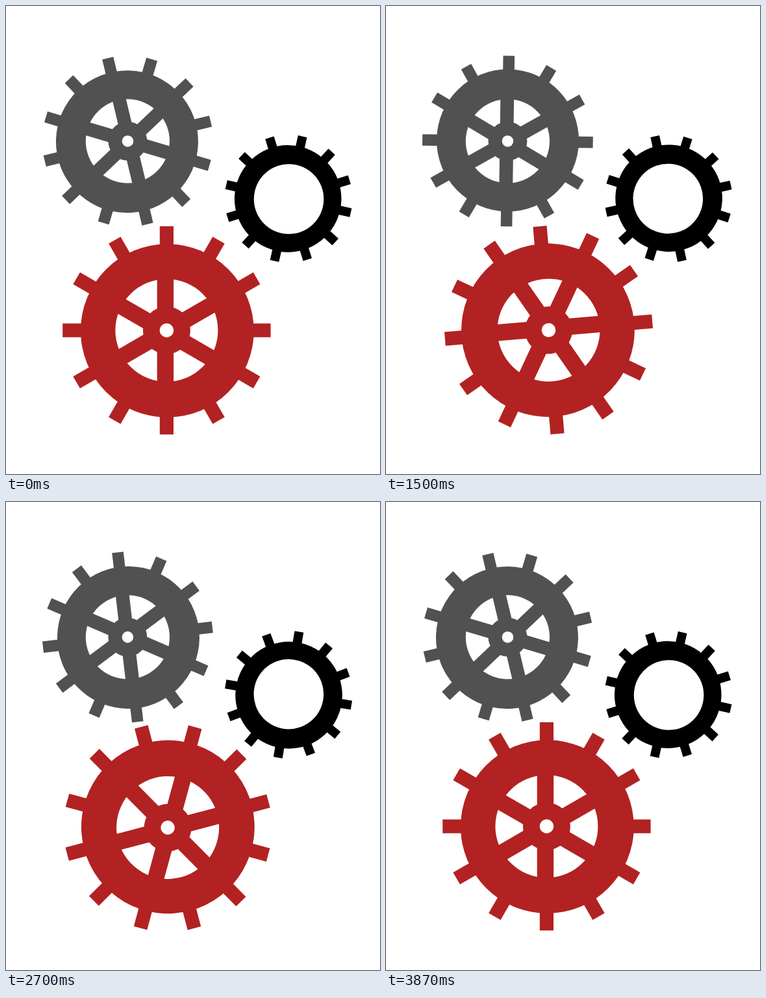
An HTML page that plays this animation: 576x720 px, repeating every 3900 ms.

```html
<!DOCTYPE html>
<html lang="en">
<head>
<meta charset="utf-8">
<title>Turning gears</title>
<style>
  html, body { margin: 0; width: 100%; height: 100%; overflow: hidden; background: #fff; }
  svg { display: block; width: 576px; height: 720px; }
</style>
</head>
<body>
<svg id="stage" viewBox="0 0 576 720" xmlns="http://www.w3.org/2000/svg"></svg>
<script>
const STEP = 30, FRAMES = 130, LAST = FRAMES - 1;

// Offsets are [x, y] from the pivot; each gear runs slightly off centre.
// half: the step at which the first half turn is complete.
const gears = [
  { pivot: [187.4, 207.9], color: '#515151', start: 226.5, half: 67,
    disc: 109.5, discAt: [0.1, -1.2], tooth: [131.3, 17.6], toothAt: [0, 0],
    hole: 64.6, holeAt: [0, 0], wheel: 0.82 },
  { pivot: [435.1, 296.4], color: '#000', start: 12.7, half: 72,
    disc: 82.3, discAt: [-0.85, 0.2], tooth: [98.2, 14], toothAt: [0, 0],
    hole: 53.8, holeAt: [0.6, 0.5] },
  { pivot: [249, 499.3], color: '#b22222', start: 0, half: 62,
    disc: 133.4, discAt: [-0.65, 0.2], tooth: [160.2, 21.2], toothAt: [-1.6, -0.3],
    hole: 79, holeAt: [-1.6, -0.3], wheel: 1 }
];

const circle = ([x, y], r, fill) =>
  `<circle cx="${x}" cy="${y}" r="${r}" fill="${fill}"/>`;

// Bars crossing at one centre, evenly spread over half a turn.
function bars([x, y], count, reach, width, fill) {
  let out = '';
  for (let i = 0; i < count; i++) {
    out += `<rect x="${-width / 2}" y="${-reach}" width="${width}" height="${2 * reach}"` +
      ` fill="${fill}" transform="translate(${x} ${y}) rotate(${i * 180 / count})"/>`;
  }
  return out;
}

function gearMarkup(g) {
  let out = bars(g.toothAt, 6, ...g.tooth, g.color) +
    circle(g.discAt, g.disc, g.color) +
    circle(g.holeAt, g.hole, '#fff');
  if (g.wheel) {
    const k = g.wheel, [x, y] = g.holeAt;
    out += bars([x - 2 * k, y + 1.9 * k], 3, 90 * k, 25.4 * k, g.color) +
      circle(g.holeAt, 36.5 * k, g.color) +
      circle(g.holeAt, 10.7 * k, '#fff');
  }
  return `<g>${out}</g>`;
}

const stage = document.getElementById('stage');
stage.innerHTML = gears.map(gearMarkup).join('');
const nodes = [...stage.children];

const turn = (n, half) =>
  n < half ? 180 * n / half : 180 + 180 * (n - half) / (LAST - half);

function draw(ms) {
  const n = Math.floor(ms / STEP) % FRAMES;
  gears.forEach((g, i) => {
    const angle = g.start + turn(n, g.half);
    nodes[i].setAttribute('transform', `translate(${g.pivot}) rotate(${angle})`);
  });
}

const begin = performance.now();
function tick() {
  draw(performance.now() - begin);
  requestAnimationFrame(tick);
}
draw(0);
requestAnimationFrame(tick);
</script>
</body>
</html>
```
